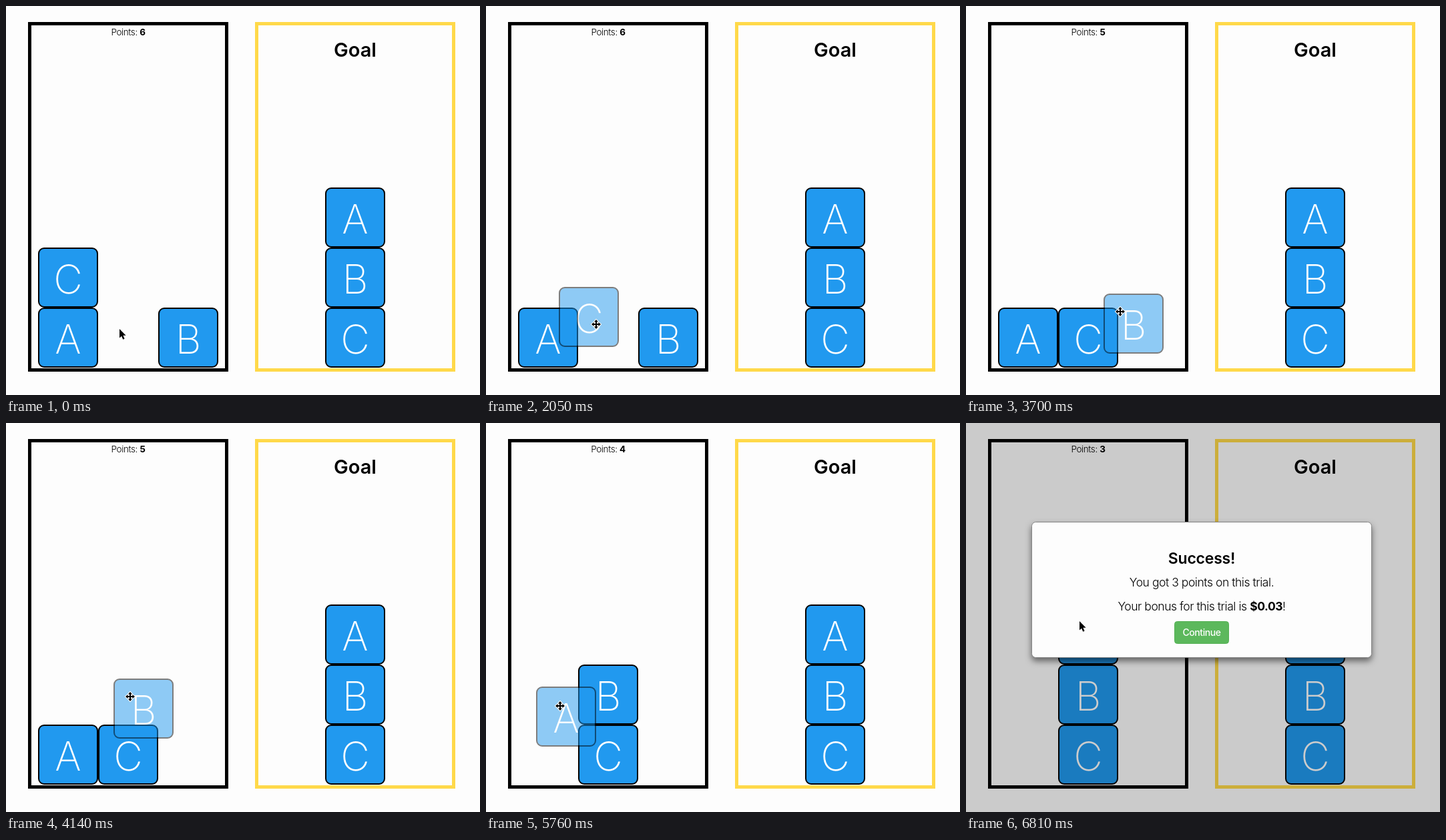
Write an HTML page that moves like this. It is 710x583 px and loops after 8000 ms.

```html
<!DOCTYPE html>
<html lang="en">
<head>
<meta charset="utf-8">
<title>Block stacking</title>
<style>
  html, body { margin: 0; width: 100%; height: 100%; overflow: hidden; background: #fdfdfd; }
  svg { display: block; }
  text { font-family: Inter, "Liberation Sans", sans-serif; text-anchor: middle; }
  .frame { fill: none; stroke-width: 5; }
  .block rect { fill: #2199ef; stroke: #000; stroke-width: 2; }
  .block text { fill: #fff; font-size: 60px; font-weight: 250; }
  .points { font-size: 13.5px; font-weight: 300; letter-spacing: -.4px; }
  .goal { font-size: 29px; font-weight: 600; }
  .title { font-size: 23px; font-weight: 600; letter-spacing: -.2px; }
  .body { font-size: 17.5px; font-weight: 300; letter-spacing: -.45px; }
  .button { font-size: 14px; font-weight: 500; letter-spacing: -.45px; fill: #fff; }
  .strong { font-weight: 700; }
  #panel { filter: drop-shadow(0 5px 5px rgba(0, 0, 0, .5)); }
  #arrow, #move { stroke: #fff; stroke-width: 2; paint-order: stroke; stroke-linejoin: round; }
</style>
</head>
<body>
<svg width="710" height="583" viewBox="0 0 710 583">
  <rect class="frame" x="35.5" y="26.5" width="295" height="519" stroke="#000"/>
  <rect class="frame" x="375.5" y="26.5" width="295" height="519" stroke="#ffd94a"/>
  <text class="points" x="183" y="44">Points: <tspan class="strong" id="score">6</tspan></text>
  <text class="goal" x="523" y="76">Goal</text>
  <g id="blocks"></g>
  <rect id="outline" x="1" y="1" width="88" height="88" rx="8" fill="none" stroke="#000" stroke-width="2"/>
  <g id="modal">
    <rect width="710" height="583" opacity=".2"/>
    <rect id="panel" x="98.5" y="148.5" width="509" height="203" rx="6" fill="#fdfdfd" stroke="#858585"/>
    <text class="title" x="353" y="211">Success!</text>
    <text class="body" x="353" y="245">You got 3 points on this trial.</text>
    <text class="body" x="353" y="281">Your bonus for this trial is <tspan class="strong">$0.03</tspan>!</text>
    <rect x="312.5" y="297.5" width="81" height="33" rx="4" fill="#5cb85c" stroke="#55b155"/>
    <text class="button" x="353" y="319">Continue</text>
  </g>
  <path id="arrow" d="M-2-2V11.5L1 8.7L3.3 13.7L5.6 12.7L3.4 7.7H7.6Z"/>
  <path id="move" d="M0-7L3-3.5H1V-1H3.5V-3L7 0L3.5 3V1H1V3.5H3L0 7L-3 3.5H-1V1H-3.5V3L-7 0L-3.5-3V-1H-1V-3.5H-3Z"/>
</svg>
<script>
const LOOP = 8000, SUCCESS = 6810, TICK = 147, START = [172, 486];
const $ = id => document.getElementById(id);

// The pointer reaches `grip`, lifts the block, carries it to `end`, then drops it.
// Slots are [column, level]; `grab` is the pointer's place within the block.
const drags = [
  { name: "C", from: [0, 1], to: [1, 0], grab: [56, 56], grip: [104, 418], end: [191, 503],
    reach: [750, 1620], carry: [1760, 2350], drop: 2500, over: 1040 },
  { name: "B", from: [2, 0], to: [1, 1], grab: [25, 27], grip: [269, 499], end: [177, 400],
    reach: [2650, 3100], carry: [3550, 4290], drop: 4440, over: 2650 },
  { name: "A", from: [0, 0], to: [1, 2], grab: [36, 29], grip: [84, 481], end: [172, 299],
    reach: [4730, 5170], carry: [5470, 6510], drop: SUCCESS, over: 4730 }
];

const slot = ([col, level]) => [48 + 90 * col, 452 - 90 * level];
const place = (el, [x, y]) => el.setAttribute("transform", `translate(${x} ${y})`);
const show = (el, on) => el.setAttribute("visibility", on ? "visible" : "hidden");

function addBlock(name) {
  const g = document.createElementNS("http://www.w3.org/2000/svg", "g");
  g.setAttribute("class", "block");
  g.innerHTML = `<rect x="1" y="1" width="88" height="88" rx="8"/><text x="45" y="69">${name}</text>`;
  $("blocks").append(g);
  return g;
}

drags.forEach((d, level) => place(addBlock(d.name), [478, slot([0, level])[1]]));
for (const d of drags) d.el = addBlock(d.name);

// Ease-out progress from 0 to 1, advancing in whole ticks.
function progress(t, [start, end], power) {
  if (t < start) return 0;
  const ticks = Math.round((end - start) / TICK);
  const tick = Math.min(ticks, Math.floor((t - start) / (end - start) * ticks));
  return 1 - (1 - (tick + 1) / (ticks + 1)) ** power;
}

function pointerAt(t) {
  let pos = START;
  const moveTo = (goal, p) => { pos = pos.map((v, i) => Math.round(v + (goal[i] - v) * p)); };
  for (const d of drags) {
    moveTo(d.grip, progress(t, d.reach, 2.3));
    moveTo(d.end, progress(t, d.carry, 1.3));
  }
  return pos;
}

function render(t) {
  t += 6; // tolerance for uneven step times
  const pointer = pointerAt(t);
  show($("outline"), false);
  for (const d of drags) {
    const [lift, arrive] = d.carry, held = t >= lift && t < d.drop;
    if (held && t >= arrive) {
      show($("outline"), true);
      place($("outline"), slot(d.to));
    }
    place(d.el, held ? pointer.map((v, i) => v - d.grab[i]) : slot(t < lift ? d.from : d.to));
    d.el.setAttribute("opacity", held ? .5 : 1);
    if (held && d.el.nextSibling) $("blocks").append(d.el);
  }
  $("score").textContent = 6 - drags.filter(d => t >= d.drop).length;
  show($("modal"), t >= SUCCESS);

  const moving = drags.some(d => t >= d.over && t < d.drop);
  show($("arrow"), !moving);
  show($("move"), moving);
  place($(moving ? "move" : "arrow"), pointer);
}

function tick() {
  render(performance.now() % LOOP);
  requestAnimationFrame(tick);
}
tick();
</script>
</body>
</html>
```
